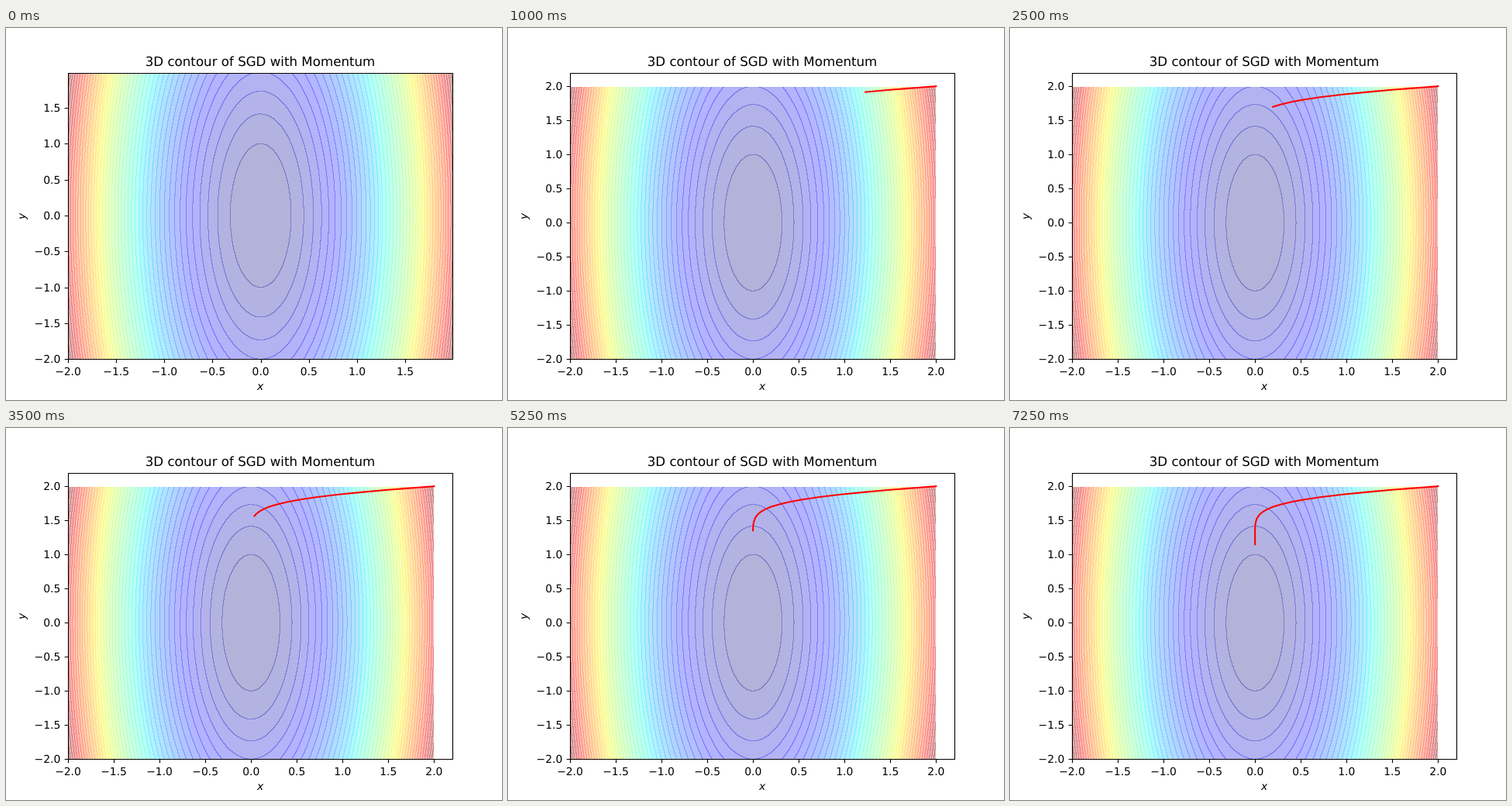
These frames come from a looping animation (640 by 480 pixels, 7.5 s). An HTML page with a canvas:

```html
<!DOCTYPE html>
<html lang="en">
<head>
<meta charset="utf-8">
<title>SGD with Momentum</title>
<style>
html, body { margin: 0; width: 100%; height: 100%; overflow: hidden; background: #fff; }
canvas, svg { position: absolute; left: 0; top: 0; width: 640px; height: 480px; }
text { font: 13.89px "DejaVu Sans", sans-serif; text-rendering: geometricPrecision; }
.title { font-size: 16.67px; }
.var { font-style: italic; }
.mid { text-anchor: middle; }
.end { text-anchor: end; }
.axis { fill: none; stroke: #000; stroke-width: 1.11; }
#trail { fill: none; stroke: #f00; stroke-width: 2.08; stroke-linecap: square; stroke-linejoin: round; }
</style>
</head>
<body>
<canvas width="640" height="480"></canvas>
<svg viewBox="0 0 640 480">
  <path id="trail"/>
  <g id="ticks"></g>
  <path class="axis" d="M80.5 58.5H576.5V427.5H80.5Z"/>
  <text class="title mid" x="328" y="49">3D contour of SGD with Momentum</text>
  <text class="var mid" x="328" y="467">x</text>
  <text class="var mid" transform="translate(25 243) rotate(-90)">y</text>
</svg>
<script>
const STEP = 250, STEPS = 30;
const BOX = { left: 80, right: 576, top: 57.6, bottom: 427.2 };
const LOW = -2, HIGH = 1.99, BANDS = 44, ALPHA = 0.3;

const ctx = document.querySelector('canvas').getContext('2d');
const trail = document.getElementById('trail');
const ticks = document.getElementById('ticks');
const clamp = v => Math.min(1, Math.max(0, v));
const ramp = (t, a, b) => clamp((t - a) / (b - a));

function jet(t) {
  return [
    ramp(t, 0.35, 0.66) - 0.5 * ramp(t, 0.89, 1),
    ramp(t, 0.125, 0.375) - ramp(t, 0.64, 0.91),
    0.5 + 0.5 * ramp(t, 0, 0.11) - ramp(t, 0.34, 0.65)
  ];
}
const palette = Array.from({ length: BANDS }, (_, i) => jet(i / (BANDS - 1)));

function makeView(max) {
  const kx = (BOX.right - BOX.left) / (max - LOW);
  const ky = (BOX.bottom - BOX.top) / (max - LOW);
  return {
    max,
    px: x => BOX.left + (x - LOW) * kx,
    py: y => BOX.bottom - (y - LOW) * ky,
    x: p => LOW + (p - BOX.left) / kx,
    y: p => LOW + (BOX.bottom - p) / ky
  };
}

// Smallest and largest square inside an interval
function squares(a, b) {
  const p = a * a, q = b * b;
  return [a * b < 0 ? 0 : Math.min(p, q), Math.max(p, q)];
}

// Each band covers every pixel it touches, so neighbours overlap on a thin line
function paintField(view) {
  const img = ctx.createImageData(640, 480);
  const right = Math.min(BOX.right, Math.ceil(view.px(HIGH)));
  const top = Math.max(58, Math.floor(view.py(HIGH)));
  for (let j = top; j < 428; j++) {
    const [y0, y1] = squares(view.y(j), view.y(j + 1));
    for (let i = BOX.left; i < right; i++) {
      const [x0, x1] = squares(view.x(i), view.x(i + 1));
      const first = Math.min(BANDS - 1, Math.floor(10 * x0 + y0));
      const last = Math.min(BANDS - 1, Math.floor(10 * x1 + y1));
      const rgb = [1, 1, 1];
      for (let b = first; b <= last; b++)
        for (let c = 0; c < 3; c++) rgb[c] += (palette[b][c] - rgb[c]) * ALPHA;
      img.data.set([...rgb.map(v => Math.round(v * 255)), 255], (j * 640 + i) * 4);
    }
  }
  return img;
}

function tickMarkup(view) {
  let out = '';
  for (let v = LOW; v <= view.max; v += 0.5) {
    const label = v.toFixed(1).replace('-', '\u2212');
    const x = view.px(v), y = view.py(v);
    const sx = Math.round(x) + 0.5, sy = Math.round(y) + 0.5;
    out += `<path class="axis" d="M${sx} 427.5v4.86M80.5 ${sy}h-4.86"/>` +
      `<text class="mid" x="${x}" y="448">${label}</text>` +
      `<text class="end" x="70.3" y="${sy + 4.8}">${label}</text>`;
  }
  return out;
}

const scenes = [HIGH, 2.2].map(max => {
  const view = makeView(max);
  return { view, field: paintField(view), ticks: tickMarkup(view) };
});

// Gradient descent with momentum on 10x² + y²
function descend(count, rate = 0.005, momentum = 0.5) {
  const pts = [[2, 2]];
  let x = 2, y = 2, vx = 0, vy = 0;
  while (pts.length < count) {
    vx = momentum * vx + rate * 20 * x;
    vy = momentum * vy + rate * 2 * y;
    pts.push([x -= vx, y -= vy]);
  }
  return pts;
}
const { px, py } = scenes[1].view;
const points = descend(STEPS).map(([x, y]) => `${px(x).toFixed(2)} ${py(y).toFixed(2)}`);

let shown = null;
function draw(now) {
  const step = Math.floor(now / STEP) % STEPS;
  const scene = scenes[step ? 1 : 0];
  if (scene !== shown) {
    ctx.putImageData(scene.field, 0, 0);
    ticks.innerHTML = scene.ticks;
    shown = scene;
  }
  trail.setAttribute('d', step > 1 ? 'M' + points.slice(0, step).join('L') : '');
}

const start = performance.now();
function loop() {
  draw(performance.now() - start);
  requestAnimationFrame(loop);
}
draw(0);
loop();
</script>
</body>
</html>
```
